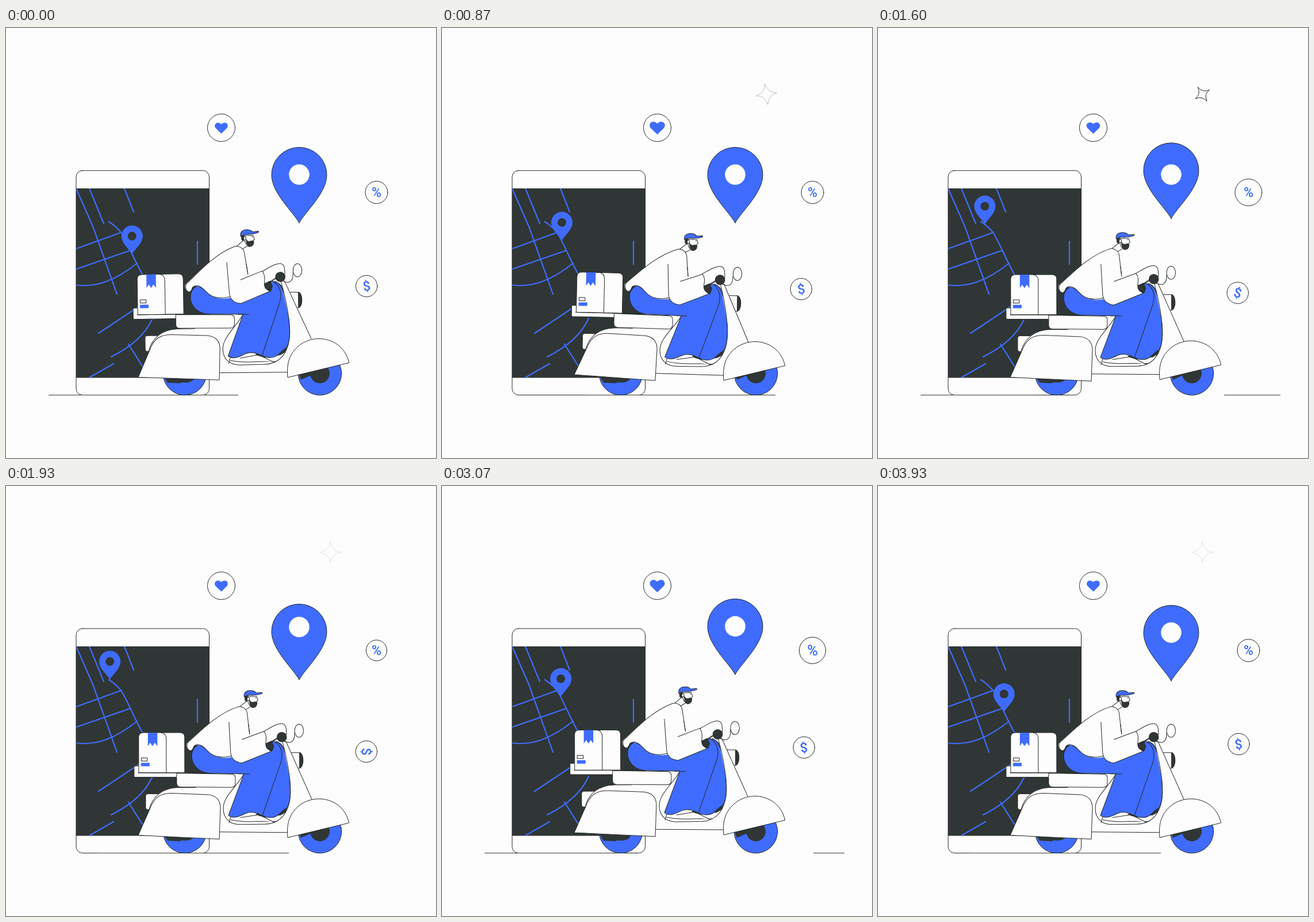
Recreate the animation shown at these times as an HTML page. Size 748x748 px, loop 4000 ms.

```html
<!DOCTYPE html>
<html lang="en">
<head>
<meta charset="utf-8">
<title>Scooter delivery</title>
<style>
html, body { margin: 0; width: 100%; height: 100%; overflow: hidden; background: #fdfdfd; }
svg { display: block; width: 100vw; height: 100vh; }
.w { fill: #fdfdfd; }
.b { fill: #3f6cff; }
.d { fill: #303635; }
.n { fill: none; }
.s { stroke: #26292a; stroke-width: 1; stroke-linejoin: round; stroke-linecap: round; }
.road { fill: none; stroke: #3f6cff; stroke-width: 2.2; stroke-linecap: round; }
text { font: 500 23px Roboto, "Liberation Sans", sans-serif; text-anchor: middle; fill: #3f6cff; }
</style>
</head>
<body>
<svg viewBox="0 0 748 748">
  <defs><clipPath id="screen"><rect x="122" y="279" width="231.5" height="329.5"/></clipPath></defs>

  <!-- phone and map -->
  <rect class="w" x="122" y="248" width="231.5" height="390.5" rx="11"/>
  <rect class="d" x="122" y="279" width="231.5" height="329.5"/>
  <g clip-path="url(#screen)">
    <g class="road">
      <path d="M122 279L151 345L193 463M145 279L170 340M206 279L222 320M333 371V411"/>
      <path d="M122 384L198 356.500M122 419.500L216 387M122 447C158 452 192 438 228 409"/>
      <path d="M179 337C188 343 196 350 201 357C210 371 226 410 238 430"/>
      <path d="M161 531L233 483M183 572C215 556 242 535 255 505M213 550L239 591M145 608L187 584"/>
    </g>
  </g>
  <g id="spot">
    <path class="b" d="M0 0C-4-9-18.500-19-18.500-32A18.500 18.500 0 0 1 18.500-32C18.500-19 4-9 0 0Z"/>
    <circle class="d" cy="-32" r="7.500"/>
  </g>
  <rect class="n s" x="122" y="248" width="231.500" height="390.500" rx="11"/>
  <path id="ground" class="n" stroke="#3b3b30" d="M74 638.500H700" stroke-dasharray="330 330"/>

  <!-- floating icons -->
  <circle class="w s" cx="374.500" cy="173.500" r="24"/>
  <path id="heart" class="b" d="M0 10.500L-10.700 0C-16-7-7-14.500 0-7.200C7-14.500 16-7 10.700 0Z"/>
  <circle id="ring" class="w s" cx="644.500" cy="286" r="19.500"/>
  <g id="percent"><text y="8.300">%</text></g>
  <g id="coin"><circle class="w s" r="18.700"/><g id="dollar"><text y="8">$</text></g></g>
  <path id="star" class="n s" vector-effect="non-scaling-stroke"
    d="M0-1Q.12-.12 1 0Q.12 .12 0 1Q-.12 .12-1 0Q-.12-.12 0-1Z"/>
  <path id="pin" class="b s" d="M510 339C499 319 462 287 462 255.500A48 48 0 0 1 558 255.500C558 287 521 319 510 339Z"/>
  <circle id="hole" class="w" cx="510" cy="255" r="17.800"/>

  <!-- wheels -->
  <circle class="b s" cx="311" cy="601" r="37.700"/>
  <path class="d" d="M274 606L281 617L302 618C307 614 317 621 327 611L331 598Z"/>
  <circle class="b s" cx="546" cy="601" r="37.700"/>
  <path class="d" d="M508 598L533 592L531 604L513 612Z"/>
  <circle class="d" cx="546" cy="601" r="17"/>

  <g id="scooter">
    <!-- rear -->
    <rect class="w s" x="243" y="535.500" width="30" height="27.500" rx="4"/>
    <rect class="w s" x="223" y="487" width="76" height="19.500" rx="1.500"/>
    <path class="w s" d="M231 499V437Q231 429 239 429H303Q311 429 311 437V499Z"/>
    <path class="n s" d="M270 429Q279 430 279 440V499"/>
    <path class="n s" stroke-width="1.500" d="M230 498.800H345"/>
    <path class="b" d="M247 429H263.500V452.500L259 446.500L255 452.500L251 446.500L247 452.500Z"/>
    <rect class="w s" x="235.500" y="473" width="10.500" height="5.500"/>
    <rect class="b" x="235" y="481.500" width="15" height="6"/>

    <!-- body -->
    <path class="w" d="M249 562C254 540 272 525 300 524.500L400 503L414 500L495 520L532 546L490 603L372 602L330 580Z"/>
    <path class="n s" d="M249 562C255 541 271 525 300 524.500H330M372 602L490 603"/>
    <path class="w s" d="M230 607.500L251 560C259 540 270 534 290 534.500L352 537Q373 540 373 560L371 614.500Z"/>
    <path class="w s" d="M297 499.500L393 501.500Q399 502 399 508V517Q399 524.500 392 524.500L303 523.500Q297 523 297 517Z"/>
    <path class="n s" d="M414 501C401 524 378 540 378 561C378 581 392 589 408 589L450 588.500C480 588 495 565 495 530"/>
    <path class="n s" d="M388 586L391 575M391 581C420 587 440 582 470 584"/>

    <!-- shoes and legs -->
    <path class="w s" d="M408 577L440 572L466 585"/>
    <path class="d" d="M434 571L448 566L452 577L440 574ZM470 574L491 555L487 568L478 573Z"/>
    <path class="b s" d="M440 470L465 446C481 442 488 460 492 490C496 525 497 556 486 562C476 568 474 577 460 577C454 577 450 576 446 573Z"/>
    <path class="b s" d="M336 450C324 455 322.500 465 323.500 474C326 490 340 499 354 499.500L414 501L387 573C396 580 406 575 416 570C428 565 438 569 446 574L478 482C483 465 480 452 466 444L420 466L370 470Z"/>
    <path class="n s" d="M405 501H424"/>

    <!-- front column, lamp and mirror -->
    <rect class="w s" x="496" y="464" width="15" height="27"/>
    <path class="d s" d="M511 464C519 466 519 489 511 491Z"/>
    <path class="w" d="M480 441L488 445L533 547L496 562L495 515Z"/>
    <path class="n s" d="M487 444L532 545M481 445C489 475 495 505 495 535M470 444C479 448 483 455 486 466"/>
    <path class="n s" d="M484 444C497 451 503 443 502 430"/>
    <ellipse class="w s" cx="510" cy="426" rx="7.700" ry="11.500"/>

    <!-- rider -->
    <g id="head">
      <path class="w" d="M403 386L418 373L432 378L417 392Z"/>
      <path class="n s" d="M405 385.500L419 374M426 384L416 389.500"/>
      <path class="w s" d="M417 366H436L438.500 373L436 375V382H424Z"/>
      <path class="d" d="M415 365L421 365L419 376L415.500 373ZM423 370C425 375 428 377 431 375.500C434 374.500 437 375 437.500 377C437 383 434 386 430 386C425 386 423.500 380 423 370Z"/>
      <ellipse class="w s" cx="421.500" cy="370.500" rx="2" ry="3.200"/>
      <circle class="d" cx="434.500" cy="368.500" r=".8"/>
      <path class="b s" d="M414.500 367C413 358 420 355 428 356C432 356.500 434 358 435.500 360L445.500 359L446 361C440 363.500 434 364 428 364C422 363.500 418 364.500 415 367Z"/>
    </g>
    <path class="w bend" d="M315 447C340 425 368 396 404 384C414 383 420 390 420 398L424 432L400 471C375 476 360 472 350 460C342 451 335 449 327 452C324 459 322 462 318 459C314 456 313 450 315 447Z"/>
    <path class="n s bend" d="M424 432L420 398C420 390 414 383 404 384C368 396 340 425 319 444C312 449 315 461 323 461C326 461 327 455 328 452C335 447 343 452 350 460C360 472 375 474 392 470"/>
    <path class="w s" d="M449 427C463 419 474 412 482 414C488 416 488 424 488 432L472 440L460 447L452 452Z"/>
    <path class="d s" d="M451 449L462 444L466 453L463 461C457 461 453 457 451 449Z"/>
    <path class="w bend" d="M388 411L391 464C392 476 400 481 411 482L461 462C454 458 452 455 452 448C453 440 455 435 449 427L424 432L412 415Z"/>
    <path class="n s bend" d="M388 411L391 464C392 476 400 481 411 482L463 461C454 458 452 455 452 448C453 440 454 434 449 427L411 441M424 432L422 415"/>
    <path class="n s" d="M459 447L474 437"/>
    <circle class="d s" cx="480" cy="437" r="8.300"/>
  </g>
  <path id="fender" class="w s" d="M490 611.500C488 590 492 575 503 563C515 549 532 544 547 544.500C573 546 592 563 596.500 586Z"/>
</svg>

<script>
const LOOP = 4000, STEPS = 60;
const el = id => document.getElementById(id);
const set = (id, name, value) => el(id).setAttribute(name, value);
const move = (id, value) => set(id, 'transform', value);
const clamp = v => Math.min(1, Math.max(0, v));
const ease = u => (1 - Math.cos(Math.PI * clamp(u))) / 2;
const wave = (pos, period, peak) => Math.cos(2 * Math.PI * (pos - peak) / period);

// Cosine-eased value from [position, value] pairs.
function keys(pos, list) {
  let value = list[0][1];
  for (let i = 1; i < list.length; i++) {
    const [a, from] = list[i - 1], [b, to] = list[i];
    if (pos >= a) value = from + (to - from) * ease((pos - a) / (b - a));
  }
  return value;
}

const bent = [...document.querySelectorAll('.bend')].map(node => [node, node.getAttribute('d')]);

// Tilts the shoulders about the hips while the hands stay put.
function bend(d, tilt) {
  return d.replace(/([\d.]+) ([\d.]+)/g, (_, sx, sy) => {
    const x = +sx, y = +sy, k = tilt * clamp((445 - y) / 50);
    return (x - k * (y - 470)).toFixed(2) + ' ' + (y + k * (x - 340)).toFixed(2);
  });
}

function ride(step) {
  const rear = -3.2 - 4 * wave(step, 5, 2);
  const front = -2 - 3.2 * wave(step, 5, 0.7);
  const tilt = -0.003 + 0.022 * wave(step, 5, 2.9);
  const deg = 180 / Math.PI;
  move('scooter', `translate(0 ${rear}) rotate(${(front - rear) / 250 * deg} 230 608)`);
  move('fender', `translate(0 ${front})`);
  move('head', `rotate(${tilt * deg} 340 470)`);
  for (const [node, d] of bent) node.setAttribute('d', bend(d, tilt));
  set('ground', 'stroke-dashoffset', step * 88 % 660);
}

function icons(step) {
  const turn = 2 * Math.PI * step / STEPS;

  const u = (1 - Math.cos(turn)) / 2, v = 1 - u;
  const quad = (a, b, c) => v * v * a + 2 * u * v * b + u * u * c;
  move('spot', `translate(${quad(219.3, 209.5, 180.5)} ${quad(394, 363, 337)})`);

  const hop = step % 20;
  move('pin', `translate(0 ${keys(hop, [[0, 0], [6.5, -11.3], [10, 0]])})`);
  move('hole', `translate(0 ${keys(hop, [[4, 0], [7.6, -18.5], [10.5, 0]])})`);
  set('ring', 'r', keys(hop, [[0, 19.5], [5, 23.8], [9.3, 18], [13, 19.5]]));
  move('percent', `translate(644.5 286) scale(${keys(hop, [[3, 1], [7, 1.12], [9.5, 1]])})`);

  const beat = keys(step % 30, [[0, 0.92], [10, 1.09], [30, 0.92]]);
  move('heart', `translate(374.5 174) scale(${beat})`);

  move('coin', `translate(${627.2 - 2.5 * Math.sin(turn)} ${455.5 - 6.5 * Math.cos(turn)})`);
  move('dollar', `rotate(${keys(step, [[20, -10], [37, 170]])})`);

  const spark = step % 15, grow = clamp((spark - 2.5) / 11.5);
  const size = 18.5 * Math.sin(Math.PI / 2 * grow);
  move('star', `translate(564.3 115.3) rotate(${-48 * (1 - grow * grow)}) scale(${Math.max(size, 0.01)})`);
  set('star', 'opacity', grow > 0 ? 1 - 0.88 * clamp((spark - 9) / 5) : 0);
}

function draw() {
  const time = performance.now() % LOOP;
  const step = Math.floor((time + 5) * STEPS / LOOP) % STEPS;
  ride(step);
  icons(step);
  requestAnimationFrame(draw);
}
draw();
</script>
</body>
</html>
```
